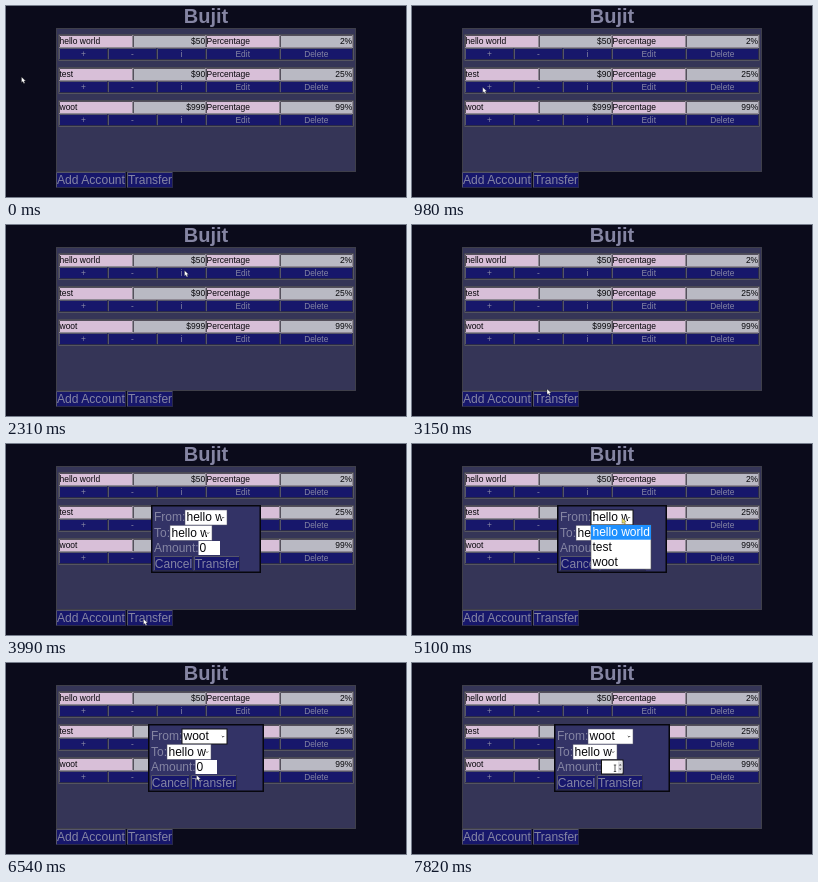
An HTML page for the animation above (8 s loop, 400 by 191 pixels).

```html
<!DOCTYPE html>
<html lang="en">
<head>
<meta charset="utf-8">
<title>Bujit</title>
<style>
  html, body { margin: 0; width: 100%; height: 100%; overflow: hidden; background: #0b0b1b; }
  svg { display: block; width: 100vw; height: 100vh; font-family: "Liberation Sans", Arial, sans-serif; }
  text { white-space: pre; }
</style>
</head>
<body>
<svg id="stage" viewBox="0 0 400 191"></svg>
<script>
const LOOP = 8000;
const NAVY = '#17176b', MUTED = '#8585a3', PANEL = '#353557', DIALOG = '#333366';
const PINK = '#d8bfd8', GRAY = '#b9b9c3', BLACK = '#08080c', WHITE = '#fff';

const TABLE_LEFT = 53, COLUMN = 73.5, ROW_PITCH = 33;
const MENU_TOP = 81, MENU_ITEM = 14.7, LINE = 15.4;
const accounts = [
  { name: 'hello world', amount: '$50', percent: '2%' },
  { name: 'test', amount: '$90', percent: '25%' },
  { name: 'woot', amount: '$999', percent: '99%' }
];

const rect = (x, y, w, h, fill, extra = '') =>
  `<rect x="${x}" y="${y}" width="${w}" height="${h}" fill="${fill}" ${extra}/>`;
const text = (x, y, size, fill, value, extra = '') =>
  `<text x="${x}" y="${y}" font-size="${size}" fill="${fill}" ${extra}>${value}</text>`;
const middle = 'text-anchor="middle"', end = 'text-anchor="end"';

// Filled box with a one pixel bevel, snapped to whole pixels
function bevel(x, y, w, h, fill, light, dark) {
  const left = Math.round(x), right = Math.round(x + w);
  const l = left + .5, r = right - .5, t = y + .5, b = y + h - .5;
  return rect(left, y, right - left, h, fill) +
    `<path d="M${l} ${b}V${t}H${r}" fill="none" stroke="${light}"/>` +
    `<path d="M${r} ${t}V${b}H${l}" fill="none" stroke="${dark}"/>`;
}

function button(x, y, w, h, size, label, pressed) {
  const edges = ['#56566a', '#2a2a48'];
  if (pressed) edges.reverse();
  return bevel(x, y, w, h, NAVY, ...edges) +
    text(x + w / 2, y + h / 2 + size * .36, size, MUTED, label, middle);
}

function accountRow({ name, amount, percent }, index) {
  const y = 28 + index * ROW_PITCH;
  const cells = [name, amount, 'Percentage', percent].map((label, i) => {
    const x = TABLE_LEFT + i * COLUMN, numeric = i % 2;
    return bevel(x, y + 1, COLUMN, 13, numeric ? GRAY : PINK, '#55505c', '#8f8994') +
      text(numeric ? x + COLUMN - .8 : x + .5, y + 10, 8.5, BLACK, label, numeric ? end : '');
  });
  const small = ['+', '-', 'i'].map((label, i) =>
    button(TABLE_LEFT + i * COLUMN * 2 / 3, y + 14, COLUMN * 2 / 3, 12, 8.4, label));
  const wide = ['Edit', 'Delete'].map((label, i) =>
    button(TABLE_LEFT + (i + 2) * COLUMN, y + 14, COLUMN, 12, 8.4, label));
  return bevel(52, y, 296, 27, '#26263c', '#4a4a55', '#55555f') + [...cells, ...small, ...wide].join('');
}

const page =
  rect(0, 0, 400, 191, '#0b0b1b') +
  text(200, 17.2, 20, MUTED, 'Bujit', middle + ' font-weight="bold"') +
  bevel(50, 22, 300, 144, PANEL, '#3f3f4a', '#3f3f4a') +
  accounts.map(accountRow).join('') +
  button(50, 166, 70, 16, 12.1, 'Add Account');

function select(x, y, w, value, focused) {
  return rect(x, y, w, 15, WHITE, focused ? 'stroke="#101010"' : 'stroke="#55556a" stroke-width=".5"') +
    `<svg x="${x}" y="${y}" width="${w - 5}" height="15">${text(1.5, 11.3, 12, BLACK, value)}</svg>` +
    `<path d="M${x + w - 5.2} ${y + 7}l1.2 1.2l1.2-1.2" fill="none" stroke="#222" stroke-width=".8"/>`;
}

function dropdown(pointerY) {
  const hovered = Math.max(0, Math.floor((pointerY - MENU_TOP) / MENU_ITEM));
  return rect(179, MENU_TOP, 60, MENU_ITEM * 3, WHITE, 'stroke="#555" stroke-width=".6"') +
    accounts.map(({ name }, i) => {
      const top = MENU_TOP + i * MENU_ITEM, on = i === hovered;
      return (on ? rect(179, top, 60, MENU_ITEM, '#1e90ff') : '') +
        text(180.5, top + 11.3, 12, on ? WHITE : BLACK, name);
    }).join('');
}

function dialog(t, pointerY) {
  const chosen = t >= 6540, editing = t >= 7510;
  const x = chosen ? 142 : 145, w = chosen ? 116 : 110;
  const inputX = x + 47.5;
  let out = rect(x + .75, 61.75, w - 1.5, 66.5, DIALOG, 'stroke="#07070d" stroke-width="1.5"') +
    ['From:', 'To:', 'Amount:'].map((label, i) => text(x + 3, 77.2 + i * LINE, 12, MUTED, label)).join('') +
    select(x + 34, 66, chosen ? 45 : 42, chosen ? 'woot' : 'hello w', t >= 5060 && !editing) +
    select(x + 19, 66 + LINE, chosen ? 44 : 42, 'hello w') +
    rect(inputX, 97, 21.5, 14, WHITE, editing ? 'stroke="#101010"' : '') +
    (t < 7690 ? text(inputX + 1, 108, 12, BLACK, '0') : '') +
    button(x + 3, 112, 39, 15, 12, 'Cancel') +
    button(x + 43, 112, 46, 15, 12, 'Transfer');
  if (t >= 7280) {
    out += rect(inputX + 16.5, 98.5, 4.5, 11, '#dedee2') +
      `<path d="M${inputX + 17.3} 102.5l1.4-1.6l1.4 1.6zm0 3l1.4 1.6l1.4-1.6z" fill="#444"/>`;
  }
  return out + (t >= 5060 && !chosen ? dropdown(pointerY) : '');
}

// Each move eases the pointer to a new place
const moves = [
  { from: 750, to: 1260, x: 144, y: 95 },
  { from: 1490, to: 1620, x: 172, y: 101 },
  { from: 1620, to: 2280, x: 178.5, y: 45.5 },
  { from: 2640, to: 2970, x: 134, y: 142 },
  { from: 3120, to: 3150, x: 135, y: 164 },
  { from: 3150, to: 3610, x: 137.5, y: 175 },
  { from: 4350, to: 4830, x: 210, y: 74 },
  { from: 5470, to: 6110, x: 190.5, y: 112 },
  { from: 6950, to: 7280, x: 203, y: 103 }
];

function pointerAt(t) {
  let x = 15.5, y = 71;
  for (const move of moves) {
    const k = Math.min(1, Math.max(0, (t - move.from) / (move.to - move.from)));
    const eased = k * k * (3 - 2 * k);
    x += (move.x - x) * eased;
    y += (move.y - y) * eased;
  }
  return [x, y];
}

function pointer(t, x, y) {
  if (t >= 7280)
    return `<path d="M${x - 1.2} ${y - 1}h2.4m-1.2 0v6.5m-1.2 0h2.4" fill="none" stroke="#333" stroke-width=".8"/>`;
  const fill = t >= 5060 && t < 5290 ? '#eee36a' : WHITE;
  return `<path d="M${x} ${y}v5.4l1.3-1l1 2l1.1-.5l-.9-2h1.7z" fill="${fill}" stroke="#111" stroke-width=".3"/>`;
}

const stage = document.getElementById('stage');
const start = performance.now();

function tick() {
  const t = (performance.now() - start) % LOOP;
  const [x, y] = pointerAt(t);
  stage.innerHTML = page +
    button(121, 166, 46, 16, 12, 'Transfer', t >= 3810 && t < 3990) +
    (t >= 3990 ? dialog(t, y) : '') +
    pointer(t, x, y);
  requestAnimationFrame(tick);
}
tick();
</script>
</body>
</html>
```
